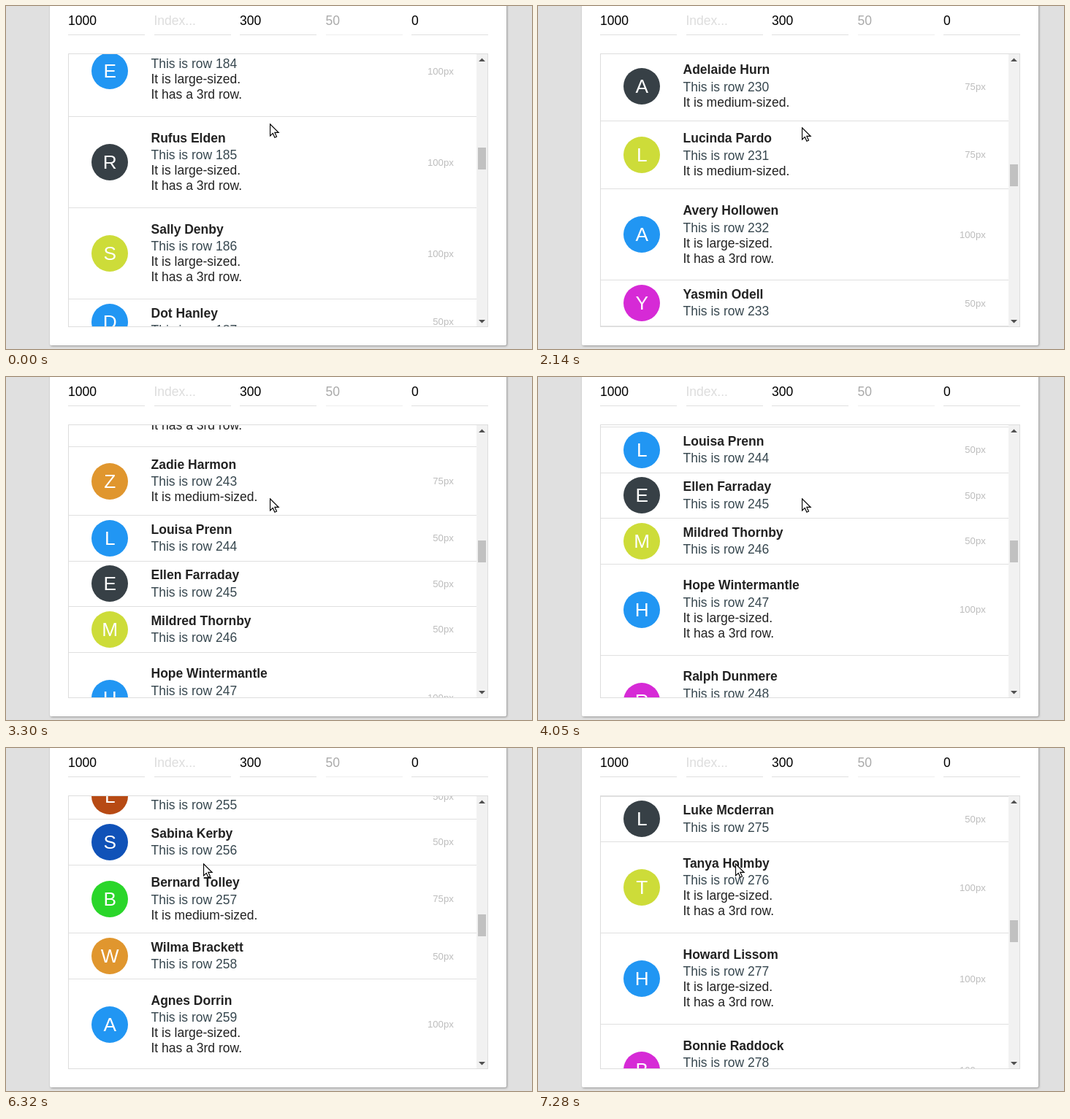
An HTML page that plays this animation: 720 by 470 pixels, repeating every 7.38 s.

```html
<!DOCTYPE html>
<html lang="en">
<head>
<meta charset="utf-8">
<title>Dynamic row heights</title>
<style>
html, body { margin: 0; width: 100%; height: 100%; overflow: hidden; background: #e0e0e0; }
body { position: relative; font: 17.5px/21px "Liberation Sans", Arial, sans-serif; color: #222; }
body > *, .row, #list, #bar, #thumb { position: absolute; box-sizing: border-box; }
#card { left: 60px; top: -10px; width: 625px; height: 475px; background: #fff; border-radius: 2px;
  box-shadow: 1px 1px 3px rgba(0, 0, 0, .35); }
.field { top: 10px; width: 105px; height: 30px; border-bottom: 1px solid #e0e0e0; color: #000; }
.hint { color: #ddd; }
.off { color: #aaa; border-color: #eee; }
#view { left: 85px; top: 65px; width: 575px; height: 375px; border: 1px solid #ddd; overflow: hidden; }
#list { left: 0; width: 558px; }
.row { left: 0; width: 558px; padding: 0 31.25px; display: flex; align-items: center;
  border-bottom: 1px solid #e0e0e0; white-space: nowrap; }
.badge { width: 50px; height: 50px; margin-right: 31.25px; border-radius: 50%; color: #fff;
  font-size: 26.25px; line-height: 50px; text-align: center; }
.text { flex: 1; }
.name { font-weight: bold; margin-bottom: 2.5px; }
.index { color: #37474f; }
.size { font-size: 13.125px; color: #bdbdbd; }
#bar { right: 0; top: 0; width: 15px; height: 373px; background: #f1f1f1; }
#bar svg { position: absolute; left: 0; top: 0; }
#thumb { left: 2px; width: 11px; height: 30px; background: #c1c1c1; }
#cursor { left: 0; top: 0; }
</style>
</head>
<body>
<div id="card"></div>
<div class="field" style="left:85px">1000</div>
<div class="field hint" style="left:202.5px">Index...</div>
<div class="field" style="left:320px">300</div>
<div class="field off" style="left:437.5px">50</div>
<div class="field" style="left:555px">0</div>
<div id="view">
  <div id="list"></div>
  <div id="bar">
    <svg width="15" height="373" fill="#505050"><path d="M3 10l4.5-4.5 4.5 4.5zM3 364h9l-4.5 4.5z"/></svg>
    <div id="thumb"></div>
  </div>
</div>
<svg id="cursor" width="16" height="24"><path d="M.5 .8V17l3.8-3.6 2.6 5.8 2.6-1.2-2.6-5.6h5.2z" fill="#fff" stroke="#000" stroke-width="1.2"/></svg>
<script>
const LOOP = 7380, STEP = 40, FIRST_ROW = 184, LAST_ROW = 280, VIEW_TOP = 66;
const $ = id => document.getElementById(id);

const COLORS = ('#b74a14 #1052b8 #2ad62a #e0962e #2196f3 #374046 #cddc39 #2196f3 #d62ad6 ' +
  '#b74a14 #1052b8 #2ad62a #e0962e #2196f3 #374046').split(' ');

// Name and size by row; the rest are drawn at random
const PEOPLE = {
  184: ['Edna Torvell', 100], 185: ['Rufus Elden', 100], 186: ['Sally Denby', 100], 187: ['Dot Hanley', 50],
  198: ['Norma Wadby', 100], 199: ['Frank Tobler', 100], 200: ['Piers Colter', 100],
  230: ['Adelaide Hurn', 75], 231: ['Lucinda Pardo', 75], 232: ['Avery Hollowen', 100], 233: ['Yasmin Odell', 50],
  241: ['Celia Dunmore', 100], 242: ['Georgiana Fennelby', 100], 243: ['Zadie Harmon', 75],
  244: ['Louisa Prenn', 50], 245: ['Ellen Farraday', 50], 246: ['Mildred Thornby', 50], 247: ['Hope Wintermantle', 100],
  255: ['Lorna Tibbet', 50], 256: ['Sabina Kerby', 50], 257: ['Bernard Tolley', 75], 258: ['Wilma Brackett', 50],
  259: ['Agnes Dorrin', 100], 275: ['Luke Mcderran', 50], 276: ['Tanya Holmby', 100],
  277: ['Howard Lissom', 100], 278: ['Bonnie Raddock', 100]
};
const GIVEN = 'Martha Owen Clara Simon Judith Ralph Nina Gordon Hazel Terence'.split(' ');
const FAMILY = 'Tarrow Wexley Dunmere Ollerby Pennock Stavely Corrin Hadwell'.split(' ');

const random = n => { const x = Math.sin(n * 12.9898) * 43758.5453; return x - Math.floor(x); };
const pick = (list, n) => list[Math.floor(random(n) * list.length)];

const tops = {};
let y = FIRST_ROW * 93, html = '';
for (let i = FIRST_ROW; i <= LAST_ROW; i++) {
  const [name, size] = PEOPLE[i] || [pick(GIVEN, i) + ' ' + pick(FAMILY, i + 500), pick([50, 75, 100], i + 900)];
  const extra = { 50: '', 75: '<div>It is medium-sized.</div>',
    100: '<div>It is large-sized.</div><div>It has a 3rd row.</div>' }[size];
  tops[i] = y;
  html += `<div class="row" style="top:${y - tops[FIRST_ROW]}px;height:${size * 1.25}px">
    <div class="badge" style="background:${COLORS[i % 15]}">${name[0]}</div>
    <div class="text"><div class="name">${name}</div><div class="index">This is row ${i}</div>${extra}</div>
    <div class="size">${size}px</div></div>`;
  y += size * 1.25;
}
$('list').innerHTML = html;

// Scroll offset that puts the top of a row at a given height on the stage
const at = (row, top) => tops[row] - top + VIEW_TOP;
const rest = at(243, 242.25), peak = at(243, 96.25);

// time, offset, speed in px per ms
const SCROLL = [
  [0, at(185, 152), 0], [830, at(185, 152), .8], [1280, at(199, 186), 3.6], [2140, at(231, 157.6), 2.2],
  [3300, peak, .2], [3780, peak + 130, 0], [3960, peak + 130, 0], [4690, rest, 0],
  [6000, rest, 1], [6320, at(256, 98), 4], [7280, at(276, 129), 0], [LOOP, at(276, 129), 0]
];
// time, x, y of the pointer tip
const POINTER = [
  [0, 361, 161], [830, 361, 161], [990, 361, 166], [4820, 361, 166], [5040, 376, 230], [5220, 340, 297],
  [5400, 279, 250], [5580, 320, 190], [5700, 270, 153], [5740, 270, 158], [LOOP, 270, 158]
];

// Segment around t, with progress advancing in steps
function segment(keys, t) {
  let i = 1;
  while (i < keys.length - 1 && keys[i][0] <= t) i++;
  const a = keys[i - 1], b = keys[i], span = b[0] - a[0];
  return { a, b, span, u: Math.floor((t - a[0]) / STEP) * STEP / span };
}

function scrollAt(t) {
  const { a, b, span, u } = segment(SCROLL, t);
  if (a[1] === b[1]) return a[1];
  const v = 1 - u;
  return a[1] * v * v * (1 + 2 * u) + b[1] * u * u * (3 - 2 * u)
    + span * u * v * (a[2] * v - b[2] * u);
}

function draw(now) {
  const t = now % LOOP, s = scrollAt(t);
  $('list').style.top = tops[FIRST_ROW] - s + 'px';
  // Rows not yet measured count with a smaller estimated height
  const total = s + 37.5 * (996 - s / 93);
  $('thumb').style.top = Math.round(16 + 312 * s / total) + 'px';
  const { a, b, u } = segment(POINTER, t);
  const mix = k => Math.round(a[k] + (b[k] - a[k]) * u);
  $('cursor').style.left = mix(1) + 'px';
  $('cursor').style.top = mix(2) + 'px';
}

const start = performance.now();
function tick() {
  draw(performance.now() - start);
  requestAnimationFrame(tick);
}
tick();
</script>
</body>
</html>
```
